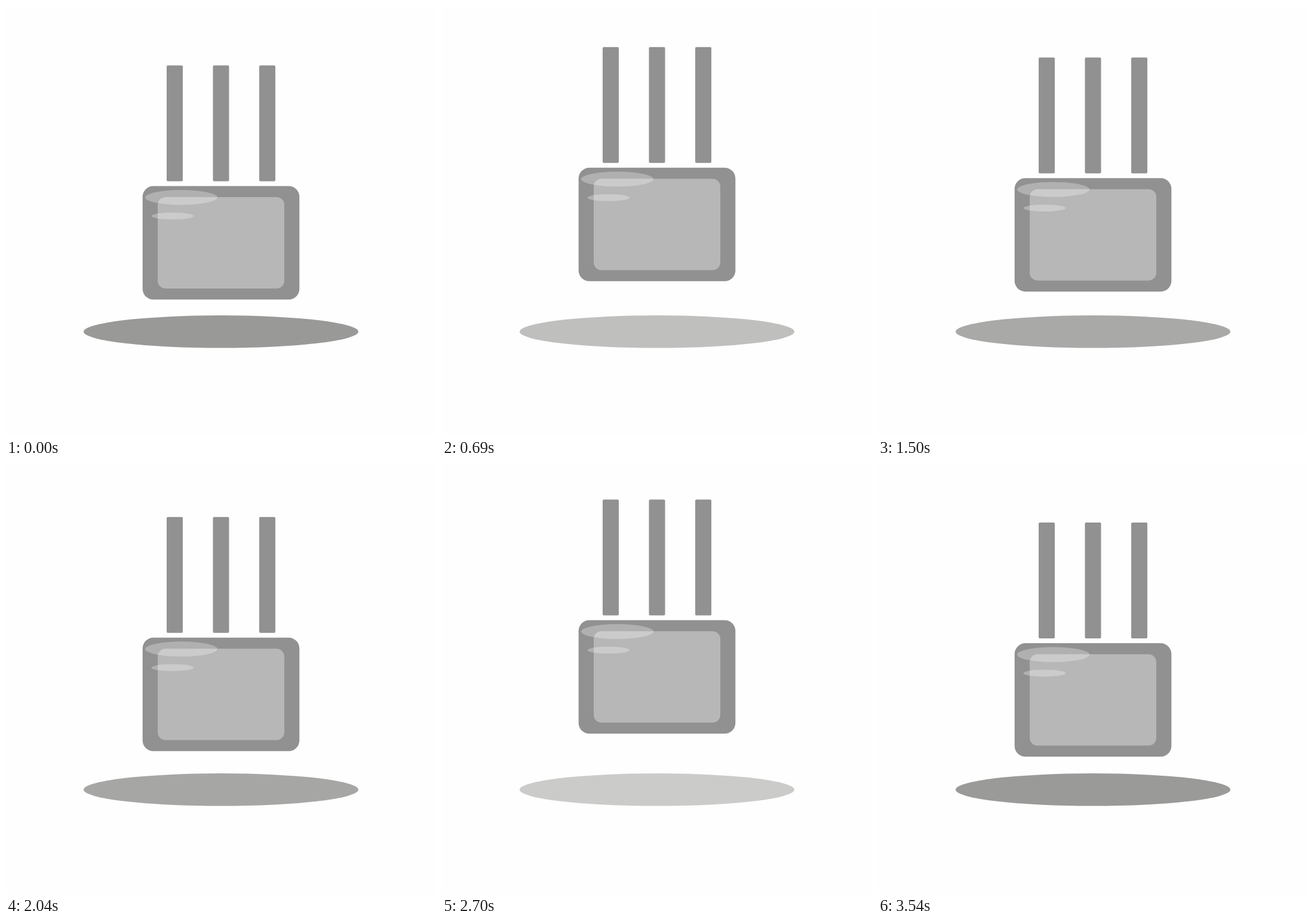
Animation of 720x720 px, one loop 3.57 s. Source, as an HTML page with a canvas:

```html
<!DOCTYPE html>
<html lang="en">
<head>
<meta charset="utf-8">
<title>Hovering block</title>
<style>
  html, body { margin: 0; width: 100%; height: 100%; overflow: hidden; background: #fefefe; }
  canvas { display: block; }
</style>
</head>
<body>
<canvas id="stage" width="720" height="720"></canvas>
<script>
const ctx = document.getElementById("stage").getContext("2d");
const LOOP = 3570, STEP = 30, LIFT = 40;
// Times at which the block is alternately at rest and fully raised.
const TURNS = [0, 900, 1800, 2700, LOOP];

function heightAt(time) {
  const i = TURNS.findIndex((start, k) => time >= start && time < TURNS[k + 1]);
  const progress = (time - TURNS[i]) / (TURNS[i + 1] - TURNS[i]);
  return i % 2 ? 1 - progress : progress;
}

function box(x, y, w, h, r, color) {
  ctx.fillStyle = color;
  ctx.beginPath();
  ctx.roundRect(x, y, w, h, r);
  ctx.fill();
}

function ellipse(cx, cy, rx, ry, color) {
  ctx.fillStyle = color;
  ctx.beginPath();
  ctx.ellipse(cx, cy, rx, ry, 0, 0, Math.PI * 2);
  ctx.fill();
}

function drawBlock() {
  for (let i = 0; i < 3; i++) box(269 + 77.5 * i, 99.5, 27, 194, 2, "#919191");
  box(228.7, 301.5, 262.6, 190, 18, "#919191");
  box(254, 320, 212, 153, 13, "#b7b7b7");
  const shine = "rgba(255, 255, 255, 0.28)";
  ellipse(293.5, 320.5, 60.5, 12.5, shine);
  ellipse(278.8, 351.6, 35.4, 5.8, shine);
}

function draw(time) {
  const height = heightAt(time);
  ctx.fillStyle = "#fefefe";
  ctx.fillRect(0, 0, 720, 720);
  ctx.globalAlpha = 1 - height / 2;
  ellipse(360, 545.3, 230, 27.2, "#999997");
  ctx.globalAlpha = 1;
  ctx.save();
  ctx.translate(0, -LIFT * height);
  drawBlock();
  ctx.restore();
}

const origin = performance.now();
function tick() {
  const time = (performance.now() - origin) % LOOP;
  draw(Math.floor(time / STEP) * STEP);
  requestAnimationFrame(tick);
}
tick();
</script>
</body>
</html>
```
